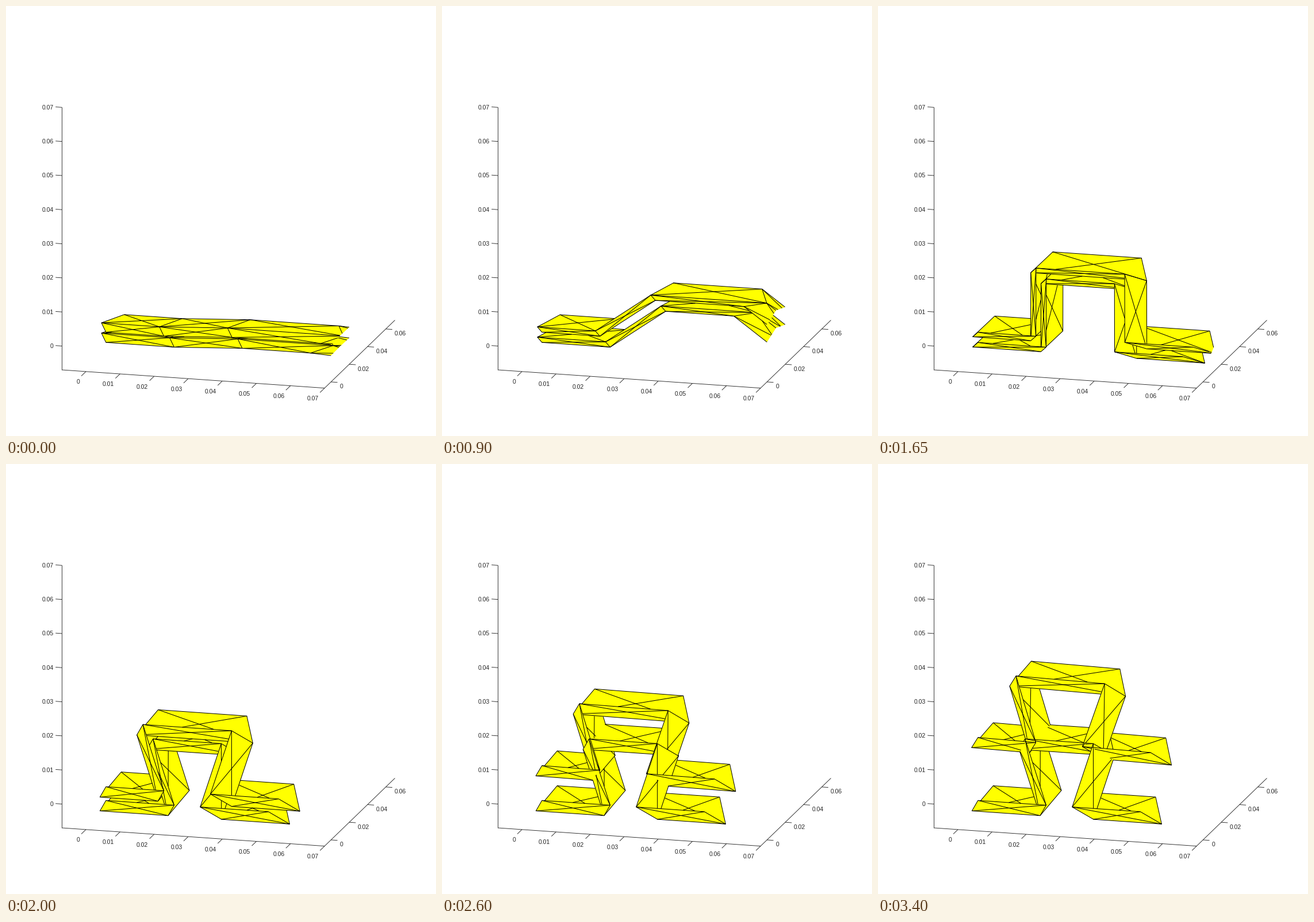
A matplotlib script that plays this animation: 748 px wide and 748 px high, repeating every 3.45 s.

```python
import numpy as np
import matplotlib.pyplot as plt
from matplotlib.animation import FuncAnimation
from matplotlib.collections import LineCollection, PolyCollection

SIZE, DPI = 748, 64
PX = 72 / DPI                      # one pixel in points
INK = "#262626"
LOW, HIGH = -0.7, 7.0              # axis limits, in hundredths
HOLD, FOLD, LIFT = 9, 29, 30       # steps of each phase
FLAT, FOLDED = 3, 108              # ramp angle in degrees
SKEW = 0.4

# Parallel projection, azimuth and elevation both 15 degrees
C, S = np.cos(np.radians(15)), np.sin(np.radians(15))
SCALE = 61.4
BASIS = SCALE * np.array([[C, S * S], [S, -C * S], [0, -C]])
VIEW = np.array([S * C, -C * C, S])
CORNER = np.array([97.5, 633.0])


def project(p):
    return (np.asarray(p, float) - LOW) @ BASIS + CORNER


def sheet(theta, left, beam, lift=0.0, tilt=0.0):
    """Folded strip as a grid of 3 rows by 6 columns of points."""
    phi = np.arcsin(SKEW * np.tan(theta / 2))
    length = np.array([left, 2, beam, 2, 2])
    slope = theta * np.array([0, 1, 0, -1, 0])
    x = SKEW + np.r_[0, np.cumsum(length * np.cos(slope))]
    z = np.r_[0, np.cumsum(length * np.sin(slope))]
    skew = SKEW * np.array([-1, -1, -1, 1, 1, 1])
    y = np.ones(6) * np.cos(phi)
    rows = [(x, 0 * y, z), (x + skew, y, z - np.sin(phi)), (x, 2 * y, z)]
    x, y, z = np.moveaxis(np.array(rows), 1, 0)
    ct, st = np.cos(tilt), np.sin(tilt)
    return np.stack([x * ct + z * st, y, z * ct - x * st + lift], axis=-1)


def panels(g):
    quads = np.stack([g[:-1, :-1], g[:-1, 1:], g[1:, 1:], g[1:, :-1]], axis=2)
    return quads.reshape(-1, 4, 3)


def creases(g):
    pairs = [(g[:, :-1], g[:, 1:]), (g[:-1], g[1:]),
             (g[:-1, :-1], g[1:, 1:]), (g[:-1, 1:], g[1:, :-1])]
    return np.concatenate([np.stack([a, b], axis=2).reshape(-1, 2, 3)
                           for a, b in pairs])


def clip(quad):
    """Cut a polygon at the upper x limit."""
    out = []
    for a, b in zip(quad, np.roll(quad, -1, axis=0)):
        if a[0] <= HIGH:
            out.append(a)
        if (a[0] <= HIGH) != (b[0] <= HIGH):
            out.append(a + (b - a) * (HIGH - a[0]) / (b[0] - a[0]))
    return out


def hidden(pts, quads, eps=0.02):
    """True where a panel lies between a point and the viewer."""
    q, f = project(pts), project(quads)
    pos = np.ones((len(pts), len(quads)), bool)
    neg = pos.copy()
    for i in range(4):
        a = f[:, i]
        e = f[:, (i + 1) % 4] - a
        side = (e[:, 0] * (q[:, 1, None] - a[:, 1])
                - e[:, 1] * (q[:, 0, None] - a[:, 0]))
        pos &= side > 0
        neg &= side < 0
    n = np.cross(quads[:, 1] - quads[:, 0], quads[:, 3] - quads[:, 0])
    facing = n @ VIEW
    facing = np.where(np.abs(facing) < 1e-9, 1e-9, facing)
    gap = ((quads[:, 0] * n).sum(axis=1) - pts @ n.T) / facing
    within = pts[:, :1] + gap * VIEW[0] <= HIGH
    return ((pos | neg) & (gap > eps) & within).any(axis=1)


def visible_runs(lines, quads, count=200):
    t = np.linspace(0, 1, count)[:, None]
    pts = lines[:, None, 0] + t * (lines[:, None, 1] - lines[:, None, 0])
    flat = pts.reshape(-1, 3)
    shown = ~hidden(flat, quads) & (flat[:, 0] <= HIGH)
    runs = []
    for p, row in zip(project(pts), shown.reshape(-1, count)):
        step = np.diff(np.r_[0, row.astype(int), 0])
        for a, b in zip(np.where(step == 1)[0], np.where(step == -1)[0]):
            if b - a > 1:
                runs.append(p[[a, b - 1]])
    return runs


fig = plt.figure(figsize=(SIZE / DPI, SIZE / DPI), dpi=DPI, facecolor="white")
ax = fig.add_axes([0, 0, 1, 1])
ax.set_xlim(0, SIZE)
ax.set_ylim(SIZE, 0)
ax.axis("off")


def stroke(a, b):
    ax.plot(*zip(a, b), color=INK, lw=0.9 * PX, solid_capstyle="butt")


def tick(point, way, value, shift, align):
    a = project(point)
    b = a + np.array(way) @ BASIS
    stroke(a, b)
    text = f"{value / 100:.2f}" if value else "0"
    ax.text(*(b + shift), text, ha=align, va="center_baseline", color=INK,
            family="Liberation Sans", size=10.5 * PX)


stroke(project([LOW, LOW, LOW]), project([LOW, LOW, HIGH]))
stroke(project([LOW, LOW, LOW]), project([HIGH, LOW, LOW]))
stroke(project([HIGH, LOW, LOW]), project([HIGH, HIGH, LOW]))
for v in range(8):
    tick([v, LOW, LOW], [0, -0.5, 0], v, (-2.5, 9.8), "right")
    tick([LOW, LOW, v], [-0.19, 0, 0], v, (-3.5, 0.2), "right")
    if v % 2 == 0:
        tick([HIGH, v, LOW], [0.19, 0, 0], v, (3.6, 6.6), "left")

skin = PolyCollection([], facecolors="#ffff00", edgecolors="none")
wires = LineCollection([], colors="black", linewidths=1.0 * PX)
ax.add_collection(skin, autolim=False)
ax.add_collection(wires, autolim=False)


def draw(i):
    k = max(0, i - HOLD)
    theta = np.radians(FLAT + (FOLDED - FLAT) * min(k / FOLD, 1))
    rise = max(0, k - FOLD) / LIFT
    grids = [sheet(theta, 2.0, 2.0),
             sheet(theta, 1.7, 2.6, 0.3 + 1.555 * rise, 0.0181 * rise)]
    quads = np.concatenate([panels(g) for g in grids])
    lines = np.concatenate([creases(g) for g in grids])
    cut = [clip(q) for q in quads]
    skin.set_verts([project(c) for c in cut if len(c) > 2])
    wires.set_segments(visible_runs(lines, quads))
    return skin, wires


anim = FuncAnimation(fig, draw, frames=69, interval=50, repeat=True,
                     repeat_delay=0)
plt.show()
```
